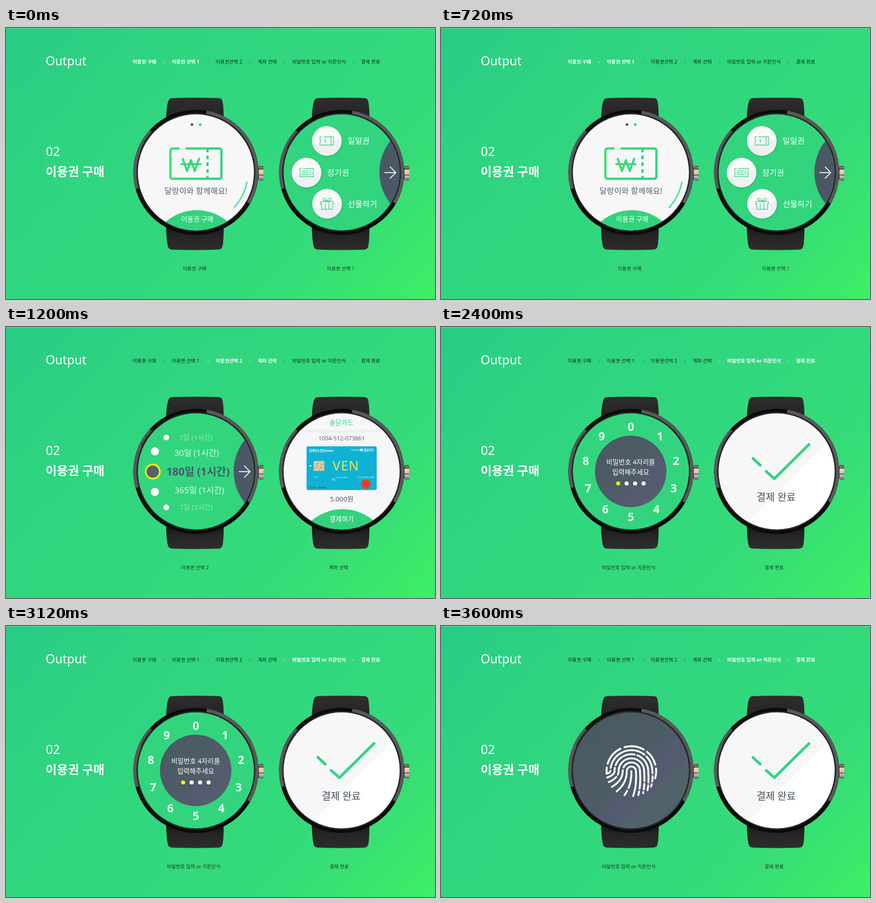
Animation, 942 px wide and 595 px high, one loop 4800 ms. Source, as an HTML page:

```html
<!DOCTYPE html>
<html lang="ko">
<head>
<meta charset="utf-8">
<title>Output</title>
<style>
html, body { margin: 0; width: 100%; height: 100%; overflow: hidden; background: #32d77d; }
svg { display: block; width: 100vw; height: 100vh; }
text { font-family: 'Noto Sans', 'Noto Sans CJK KR', 'Noto Sans CJK', sans-serif; white-space: pre; }
</style>
</head>
<body>
<svg id="stage" viewBox="0 0 942 595" preserveAspectRatio="none" xmlns="http://www.w3.org/2000/svg">
<defs>
  <linearGradient id="bg" gradientUnits="userSpaceOnUse" x1="0" y1="0" x2="802" y2="758">
    <stop offset="0" stop-color="#29cc85"/><stop offset=".25" stop-color="#2fd480"/>
    <stop offset=".55" stop-color="#32d87d"/><stop offset=".76" stop-color="#36dc78"/>
    <stop offset=".86" stop-color="#39e46f"/><stop offset="1" stop-color="#3ef066"/>
  </linearGradient>
  <linearGradient id="strap" x1="0" y1="0" x2="0" y2="1">
    <stop offset="0" stop-color="#2e2e2e"/><stop offset="1" stop-color="#232323"/>
  </linearGradient>
  <linearGradient id="strapLow" x1="0" y1="0" x2="0" y2="1">
    <stop offset="0" stop-color="#161616"/><stop offset=".4" stop-color="#242424"/><stop offset="1" stop-color="#2e2d2c"/>
  </linearGradient>
  <linearGradient id="crown" x1="0" y1="0" x2="0" y2="1">
    <stop offset="0" stop-color="#4a4744"/><stop offset=".14" stop-color="#8d8780"/>
    <stop offset=".2" stop-color="#3a3733"/><stop offset=".28" stop-color="#ead7bd"/>
    <stop offset=".56" stop-color="#d6bfa2"/><stop offset=".62" stop-color="#57504a"/>
    <stop offset=".7" stop-color="#c9c9c9"/><stop offset="1" stop-color="#5d5d5d"/>
  </linearGradient>
  <linearGradient id="mint" gradientUnits="userSpaceOnUse" x1="359" y1="262" x2="475" y2="333">
    <stop offset="0" stop-color="#3de36f"/><stop offset="1" stop-color="#2fd184"/>
  </linearGradient>
  <linearGradient id="slate" gradientUnits="userSpaceOnUse" x1="327" y1="227" x2="507" y2="407">
    <stop offset="0" stop-color="#4a5a62"/><stop offset=".56" stop-color="#4d5c66"/>
    <stop offset=".6" stop-color="#555a6f"/><stop offset=".74" stop-color="#555b6e"/>
    <stop offset=".82" stop-color="#51646b"/><stop offset="1" stop-color="#50616a"/>
  </linearGradient>
  <linearGradient id="sheen" gradientUnits="userSpaceOnUse" x1="647" y1="227" x2="827" y2="407">
    <stop offset=".63" stop-color="#f7f7f8"/><stop offset=".64" stop-color="#fff"/>
  </linearGradient>
  <linearGradient id="button" x1="0" y1="0" x2=".25" y2="1">
    <stop offset=".6" stop-color="#f9f9fa"/><stop offset=".64" stop-color="#eff0f4"/>
  </linearGradient>
  <filter id="soft" x="-30%" y="-30%" width="160%" height="160%">
    <feDropShadow dx="1" dy="2" stdDeviation="2" flood-color="#0c6a45" flood-opacity=".25"/>
  </filter>
  <clipPath id="face"><circle cx="417" cy="317" r="127.5"/></clipPath>
  <clipPath id="faceR"><circle cx="737" cy="317" r="127.5"/></clipPath>
</defs>
<rect width="942" height="595" fill="url(#bg)"/>
<rect width="942" height="1" fill="#6be0a8"/>
<g id="art"></g>
</svg>
<script>
const GREEN = '#32d57f', SLATE = '#4c5966', PAPER = '#f7f7f8', YELLOW = '#f0f30c';
const SHIFT = 320, HOLD = 1200;

const text = (x, y, size, fill, str, weight = 400, extra = '') =>
  `<text x="${x}" y="${y}" font-size="${size}" fill="${fill}" font-weight="${weight}" ${extra}>${str}</text>`;
const mid = (x, y, size, fill, str, weight) => text(x, y, size, fill, str, weight, 'text-anchor="middle"');
const dot = (x, y, r, fill, extra = '') => `<circle cx="${x}" cy="${y}" r="${r}" fill="${fill}" ${extra}/>`;
const box = (x, y, w, h, fill, extra = '') =>
  `<rect x="${x}" y="${y}" width="${w}" height="${h}" fill="${fill}" ${extra}/>`;
const line = (d, color, width, extra = '') =>
  `<path d="${d}" fill="none" stroke="${color}" stroke-width="${width}" ${extra}/>`;
const ROUND = 'stroke-linecap="round" stroke-linejoin="round"';

// Point on a circle; degrees run clockwise from the right.
const polar = (cx, cy, r, deg) => {
  const a = deg * Math.PI / 180;
  return [(cx + r * Math.cos(a)).toFixed(1), (cy + r * Math.sin(a)).toFixed(1)];
};
const arc = (cx, cy, r, from, to) =>
  `M${polar(cx, cy, r, from)} A${r} ${r} 0 ${to - from > 180 ? 1 : 0} 1 ${polar(cx, cy, r, to)}`;

function watch(dx) {
  return `<g transform="translate(${dx})">
    <path d="M351.500 200 C352 180 354 164 358 157 Q360 154.500 364 154 Q417 152 468 154 Q472 154.500 474 157 C477 164 478 180 478 200Z" fill="url(#strap)"/>
    <path d="M351.500 435 C352 460 354 478 357 483 Q359 486 363 486.500 Q417 488.500 468 486.500 Q472 486 474 483 C477 478 478 460 478 435Z" fill="url(#strapLow)"/>
    ${box(552, 306, 5, 26, '#111')}
    ${box(555, 303, 10.5, 32, 'url(#crown)', 'rx="1.5"')}
    ${dot(417, 317, 137.5, '#0b0b0b')}
    ${line(arc(417, 317, 134, 280, 390), '#58595a', 7)}
    ${line(arc(417, 317, 134, 164.5, 222.5), '#58595a', 7)}
    ${line(arc(417, 317, 131.5, 204, 222.5), '#343536', 2)}
    ${dot(417, 317, 129.7, '#1c1f1f', 'stroke="#353839" stroke-width="1"')}
  </g>`;
}

const screen = (dx, fill, inner) =>
  `<g clip-path="url(#${dx ? 'faceR' : 'face'})">${box(287 + dx, 187, 260, 260, fill)}${inner}</g>`;

const bottomTab = (dx, label, size, y) =>
  dot(419 + dx, 504, 104, '#30d37c', 'filter="url(#soft)"') + mid(420 + dx - (dx ? 3 : 0), y, size, '#fff', label);

const sideTab = dx =>
  dot(610 + dx, 316.5, 110, SLATE, 'filter="url(#soft)"') +
  line(`M${511 + dx} 317.500 H${536 + dx} M${523 + dx} 304.500 L${536 + dx} 317.500 L${523 + dx} 330.500`, '#fff', 1.8);

function buyScreen() {
  const ticket = 'M396 264.500 H468 Q473 264.500 473 269.500 V326 Q473 331 468 331 H366 Q361 331 361 326 V269.500 Q361 264.500 366 264.500 H379';
  return screen(0, PAPER,
    dot(408.3, 212, 3, '#4f5b68') + dot(426.5, 212, 3, GREEN) +
    line(ticket, 'url(#mint)', 5, ROUND) +
    line('M442.500 266 V331', '#31d581', 5, 'stroke-dasharray="8 7" stroke-dashoffset="1"') +
    line('M388 287 L397.500 314 L406 290 L414.500 314 L424 287 M385 299 H427', 'url(#mint)', 4.6, ROUND) +
    mid(417, 364, 17.5, '#56626d', '달랑이와 함께해요!', 300) +
    line(arc(417, 317, 114, 11, 42), '#62e1a0', 3.6, ROUND) +
    bottomTab(0, '이용권 구매', 14.6, 425));
}

function menuScreen() {
  const button = (x, y, icon) =>
    dot(x, y, 32.5, 'url(#button)', 'filter="url(#soft)"') +
    `<g transform="translate(${x} ${y})">${line(icon, '#35d581', 1.4, ROUND)}</g>`;
  const pass = 'M-7 -9 H15 V-3 Q12 0 15 3 V9 H-15 V3 Q-12 0 -15 -3 V-9 H-11';
  const gift = 'M-12 -2 V11 Q-12 12 -11 12 H11 Q12 12 12 11 V0 M-14 2 V-4 Q-14 -5 -13 -5 H13 Q14 -5 14 -4 V0 ' +
    'M-4 -1 V12 M4 -5 V12 M0 -6 C-4 -14 -10 -14 -9 -9 Q-7 -6 0 -6 C4 -14 10 -14 9 -9 Q7 -6 0 -6';
  return screen(SHIFT, '#32d57d',
    sideTab(SHIFT) +
    button(704.5, 248, pass + ' M9 -9 V9') + mid(701, 252, 11, '#35d581', '1', 700) +
    button(660, 317.5, pass + ' M-10 -4 H4 M8 -4 H10 M-10 0 H2 M6 0 H10 M-10 4 H5 M8 4 H10') +
    button(705, 386, gift) +
    text(750, 254, 17.5, '#fff', '일일권') +
    text(705, 323.5, 17.5, '#fff', '정기권') +
    text(750.5, 392.5, 17.5, '#fff', '선물하기'));
}

function periodScreen() {
  const faint = '#94eab8', pale = '#dcf9e8';
  return screen(0, '#32d57d',
    sideTab(0) +
    dot(352, 242.5, 6.3, '#fff') + dot(327, 273, 9, '#fff') +
    dot(322.3, 317.5, 15.5, '#566070', `stroke="${YELLOW}" stroke-width="3.8"`) +
    dot(327, 362, 9, '#fff') + dot(352, 396, 6.3, '#fff') +
    text(380.5, 248, 15.3, faint, '7일 (1시간)') +
    text(369.5, 282.5, 18.4, pale, '30일 (1시간)') +
    text(352, 326, 23.3, '#43596a', '180일 (1시간)', 600) +
    text(370, 365, 18.5, pale, '365일 (1시간)') +
    text(381, 401, 15.3, faint, '7일 (2시간)'));
}

function cardScreen() {
  const card = box(660, 262, 154, 96, '#10b2d3', 'rx="3.5"') +
    text(666, 274, 6.3, '#fff', '함께가는솔담check', 600) +
    text(756, 272, 5, '#fff', '+finmark') + dot(780.5, 270, 3, '#fff') +
    text(785, 272.5, 6.3, '#fff', '솔담카드', 700) +
    `<path d="M666 305 l4 -2.500 v5z" fill="#fff"/>` +
    box(675.5, 294, 23.500, 22, '#dcc9a0', 'rx="3"') +
    line('M675.500 301 H684 V309 H675.500 M699 301 H691 V309 H699 M684 301 L687 294 M691 309 L688 316', '#a58e62', .8) +
    text(717, 314.5, 29, '#e6e650', 'VEN', 300, 'letter-spacing="1"') +
    text(676, 330.5, 4.2, '#e4f7fb', '5353') +
    text(726, 332, 3.6, '#e4f7fb', 'MONTH/YEAR') +
    text(715, 334.5, 3, '#e4f7fb', 'VALID') + text(715, 338, 3, '#e4f7fb', 'THRU') +
    text(772, 332, 6, '#dff3f7', 'PLATINUM', 400, 'letter-spacing=".9"') +
    dot(790, 345, 10.5, '#e8402c') +
    text(667, 353.5, 3.4, '#c2343b', '■ CHECK', 700) + text(686, 353.5, 3.4, '#173a56', 'NATIONAL', 700);
  return screen(SHIFT, '#f7f7f9',
    mid(736.5, 215, 14.4, '#3bd283', '솔담카드') +
    box(643, 226, 178, 6, '#eeeef4', 'rx="3"') +
    mid(737, 249, 12.6, '#5a6570', '1004-512-073861') + card +
    mid(737, 383, 15, '#56616c', '5.000원') +
    bottomTab(SHIFT, '결제하기', 14.4, 426.5));
}

function pinScreen() {
  const spots = [[417, 219], [481, 240], [516, 294], [511, 354], [473, 400]];
  const digits = Array.from({ length: 10 }, (_, n) => {
    const mirror = n > 5;
    const [x, y] = n === 5 ? [417, 417] : spots[mirror ? 10 - n : n];
    return mid(mirror ? 834 - x : x, y + 9, 25, '#e9fcf1', n, 600);
  }).join('');
  const dots = [0, 1, 2, 3].map(i => dot(389 + i * 18.6, 343.5, 4.6, i ? '#fff' : YELLOW)).join('');
  return screen(0, '#32d57d', digits + dot(416.5, 317, 78.5, 'url(#slate)') +
    mid(416.5, 302, 14.7, '#fff', '비밀번호 4자리를', 300) +
    mid(416.5, 324, 14.7, '#fff', '입력해주세요', 300) + dots);
}

// Ridges: a half ring on top, with both legs running out to a common rim.
function printScreen() {
  const cx = 418, cy = 318.5, rim = 55;
  const dashes = ['150 6 9 5', '46 6 90 6', '20 6 118 6 12 6', '30 6 52 6 70 6', '12 6 96 6 40 6'];
  const ridges = dashes.map((dash, k) => {
    const r = 10 + 9 * k;
    const [x0, y0] = polar(cx, cy, rim, 126 + 16 * k - k * k);
    const [x1, y1] = polar(cx, cy, rim, 86 - 12 * k);
    const leg = y => cy + (y - cy) * .6;
    const d = `M${x0} ${y0} Q${cx - r} ${leg(y0)} ${cx - r} ${cy} A${r} ${r} 0 0 1 ${cx + r} ${cy} ` +
      `Q${cx + r + 2} ${leg(y1)} ${x1} ${y1}`;
    return line(d, '#f7f8f9', 4.2, `${ROUND} stroke-dasharray="${dash}"`);
  }).join('');
  const [ex, ey] = polar(cx, cy, rim, 106);
  return screen(0, 'url(#slate)', ridges +
    line(`M${cx} ${cy} Q${cx + 1} 350 ${ex} ${ey}`, '#f7f8f9', 4.2, `${ROUND} stroke-dasharray="38 7"`) +
    [[174, 188], [197, 244], [254, 300], [309, 345], [354, 377]]
      .map(([a, b]) => line(arc(cx, cy, 54.5, a, b), '#f7f8f9', 4.2, ROUND)).join(''));
}

const doneScreen = () => screen(SHIFT, 'url(#sheen)',
  line('M685 288.500 L701 303.500 M714 317 L732 333 L808 258', '#33d483', 6, ROUND) +
  mid(736, 381, 21.8, '#46525e', '결제 완료', 500));

const STEPS = [[278, '이용권 구매'], [364, '이용권 선택 1'], [460.5, '이용권선택 2'],
  [552.5, '계좌 선택'], [628.5, '비밀번호 입력 or 지문인식'], [779.5, '결제 완료']];
const DASHES = [345.5, 442, 534, 610, 761];

// The two steps of a stage light up, with the dash before and between them.
function nav(stage) {
  const first = stage * 2;
  const style = on => on ? ['#fff', 700] : ['#0d2a1b', 400];
  const part = (x, str, on) => {
    const [fill, weight] = style(on);
    return text(x, 78, 10.7, fill, str, weight);
  };
  return STEPS.map(([x, s], i) => part(x, s, i >> 1 === stage)).join('') +
    DASHES.map((x, i) => part(x, '-', i === first || i === first - 1)).join('');
}

const captions = (a, b, xa, xb) =>
  mid(xa, 531.5, 10.7, '#153826', a) + mid(xb, 531.5, 10.7, '#153826', b);

const lastCaptions = captions('비밀번호 입력 or 지문인식', '결제 완료', 412, 731.5);
const scenes = [
  nav(0) + buyScreen() + menuScreen() + captions('이용권 구매', '이용권 선택 1', 414, 735),
  nav(1) + periodScreen() + cardScreen() + captions('이용권 선택 2', '계좌 선택', 415, 730),
  nav(2) + pinScreen() + doneScreen() + lastCaptions,
  nav(2) + printScreen() + doneScreen() + lastCaptions
];

const art = document.getElementById('art');
art.innerHTML =
  text(87, 82, 26.7, '#fff', 'Output', 500) +
  text(87.5, 280.5, 27, '#fff', '02', 500) +
  text(87, 325, 26.6, '#fff', '이용권 구매', 700) +
  watch(0) + watch(SHIFT) +
  scenes.map(s => `<g class="scene">${s}</g>`).join('');
const groups = [...art.querySelectorAll('.scene')];

function draw() {
  const now = Math.floor(performance.now() / HOLD) % groups.length;
  groups.forEach((g, i) => g.setAttribute('display', i === now ? 'inline' : 'none'));
  requestAnimationFrame(draw);
}
draw();
</script>
</body>
</html>
```
